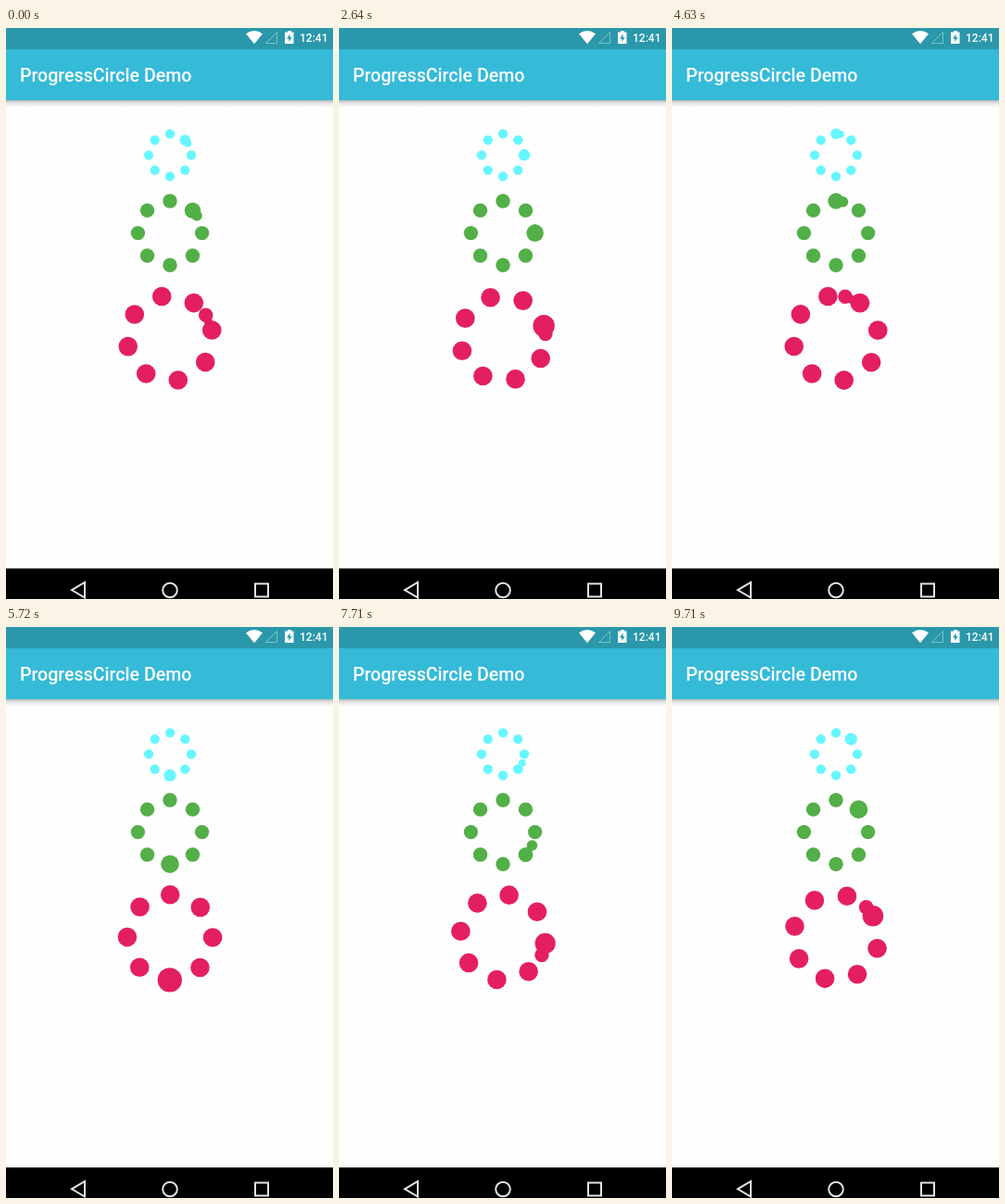
Write an HTML page with a canvas that moves like this. It is 353 by 617 pixels and loops after 9810 ms.

```html
<!DOCTYPE html>
<html lang="en">
<head>
<meta charset="utf-8">
<title>ProgressCircle Demo</title>
<style>
  html, body { margin: 0; width: 100%; height: 100%; overflow: hidden; background: #fefefe; }
  svg, canvas { position: absolute; left: 0; top: 0; width: 353px; height: 617px; }
  text { font-family: Roboto, sans-serif; font-weight: 500; fill: #fff; }
</style>
</head>
<body>
<svg viewBox="0 0 353 617">
  <defs>
    <linearGradient id="shadow" x2="0" y2="1">
      <stop offset="0" stop-color="#000" stop-opacity=".28"/>
      <stop offset=".4" stop-color="#000" stop-opacity=".1"/>
      <stop offset="1" stop-color="#000" stop-opacity="0"/>
    </linearGradient>
  </defs>
  <rect y="78" width="353" height="8" fill="url(#shadow)"/>
  <rect width="353" height="23" fill="#2a98aa"/>
  <rect y="23" width="353" height="55" fill="#35bad8"/>
  <text x="15" y="58" font-size="19.6">ProgressCircle Demo</text>

  <g fill="#fff">
    <path d="M259 6.2Q268 -.2 277 6.2L268 17.2Z"/>
    <path d="M280.5 16.5H292.5V4.5Z" fill="none" stroke="#7fc1cc"/>
    <path d="M301 4.5H304V3H308V4.5H310.500V17H301Z"/>
    <path d="M306.500 6.500L303 11.500H305.300V15L308.700 10H306.500Z" fill="#2a98aa"/>
    <text x="317" y="15" font-size="12">12:41</text>
  </g>

  <rect y="584" width="353" height="33" fill="#000"/>
  <g fill="none" stroke="#e4e4e4" stroke-width="2">
    <path d="M85 599V615.500L71 607.300Z"/>
    <circle cx="177" cy="607.500" r="7.800"/>
    <rect x="269" y="600.500" width="14" height="14"/>
  </g>
</svg>
<canvas></canvas>
<script>
const LOOP = 9810, STEP = 60;
const DOTS = 8, GAP = 360 / DOTS;

// [time in ms, orbiter angle in degrees clockwise from the top]
const KEYS = [[0, 777], [1420, 986.5], [2640, 1164], [4630, 1452.5],
              [6780, 1787.5], [8610, 2046], [9710, 2205], [LOOP, 2217]];

const RINGS = [
  { y: 137.3, radius: 23, dot: 5.15, color: '#67f6ff', spin: 0 },
  { y: 221.6, radius: 34.6, dot: 7.7, color: '#53af47', spin: 0 },
  { y: 335.3, radius: 46.1, dot: 10.3, color: '#e41e63', spin: 1 / 3 },
];

const canvas = document.querySelector('canvas');
const ctx = canvas.getContext('2d');
const scale = window.devicePixelRatio || 1;
canvas.width = 353 * scale;
canvas.height = 617 * scale;

function orbitAngle(time) {
  const i = KEYS.findIndex(key => key[0] > time);
  const [t0, a0] = KEYS[i - 1], [t1, a1] = KEYS[i];
  if (t1 === LOOP) return a0;
  const held = Math.floor((time - t0) / STEP) * STEP;
  return a0 + (a1 - a0) * held / (t1 - t0);
}

function pointOn(ring, angle) {
  const a = angle * Math.PI / 180;
  return { x: 177 + ring.radius * Math.sin(a), y: ring.y - ring.radius * Math.cos(a) };
}

function disc(p, r) {
  ctx.beginPath();
  ctx.arc(p.x, p.y, r, 0, 2 * Math.PI);
  ctx.fill();
}

// Liquid neck between two discs
function bridge(p, pr, q, qr) {
  const a = Math.atan2(q.y - p.y, q.x - p.x) + Math.PI / 2;
  const c = Math.cos(a), s = Math.sin(a);
  const mx = (p.x + q.x) / 2, my = (p.y + q.y) / 2;
  ctx.beginPath();
  ctx.moveTo(p.x + pr * c, p.y + pr * s);
  ctx.quadraticCurveTo(mx, my, q.x + qr * c, q.y + qr * s);
  ctx.lineTo(q.x - qr * c, q.y - qr * s);
  ctx.quadraticCurveTo(mx, my, p.x - pr * c, p.y - pr * s);
  ctx.fill();
}

function drawRing(ring, angle) {
  ctx.fillStyle = ring.color;
  const orbiter = pointOn(ring, angle), orbiterR = ring.dot * 0.75;
  disc(orbiter, orbiterR);
  for (let i = 0; i < DOTS; i++) {
    const dotAngle = i * GAP + angle * ring.spin;
    const turn = (((angle - dotAngle) % 360) + 360) % 360;
    const nearness = 1 - Math.min(turn, 360 - turn) / (GAP / 2);
    const dot = pointOn(ring, dotAngle);
    const r = ring.dot * (1 + 0.28 * Math.max(0, nearness));
    disc(dot, r);
    if (nearness > 0) bridge(orbiter, orbiterR, dot, r);
  }
}

function draw() {
  const angle = orbitAngle(performance.now() % LOOP);
  ctx.setTransform(scale, 0, 0, scale, 0, 0);
  ctx.clearRect(0, 0, 353, 617);
  for (const ring of RINGS) drawRing(ring, angle);
  requestAnimationFrame(draw);
}
draw();
</script>
</body>
</html>
```
